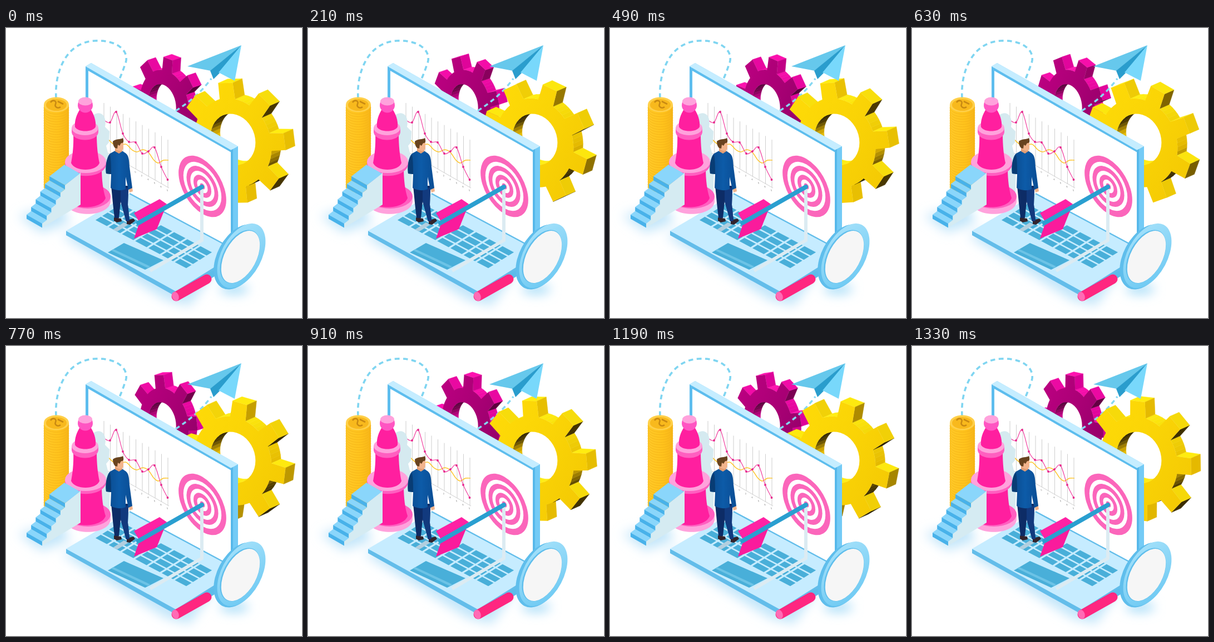
An HTML page for the animation above (1.4 s loop, 532 px wide and 522 px high).

```html
<!DOCTYPE html>
<html lang="en">
<head>
<meta charset="utf-8">
<title>Business target</title>
<style>
html, body { margin: 0; width: 100%; height: 100%; overflow: hidden; background: #fff; }
svg { display: block; width: 532px; height: 522px; }
text { font: 4px Arial, "Liberation Sans", sans-serif; fill: #555; }
</style>
</head>
<body>
<svg viewBox="0 0 532 522">
<defs>
  <filter id="soft" x="-30%" y="-60%" width="160%" height="220%"><feGaussianBlur stdDeviation="10"/></filter>
  <linearGradient id="gold" x2="1" y2=".6"><stop stop-color="#ffdc08"/><stop offset=".6" stop-color="#fad406"/><stop offset="1" stop-color="#f5cb04"/></linearGradient>
  <linearGradient id="plum" x2="1" y2=".7"><stop stop-color="#c00084"/><stop offset=".6" stop-color="#a80074"/><stop offset="1" stop-color="#94006a"/></linearGradient>
  <linearGradient id="coin"><stop stop-color="#ffc928"/><stop offset=".6" stop-color="#ffc31c"/><stop offset="1" stop-color="#f7b518"/></linearGradient>
  <linearGradient id="suit"><stop stop-color="#0a4a8c"/><stop offset=".5" stop-color="#0d5ba8"/><stop offset="1" stop-color="#0a4d94"/></linearGradient>
  <linearGradient id="rim" x2="1" y2="1"><stop stop-color="#a9e3fb"/><stop offset="1" stop-color="#68c7f2"/></linearGradient>
</defs>

<g filter="url(#soft)" fill="#c3e6fa">
  <path d="M22 338L100 318 115 350 64 368Z"/>
  <path d="M100 374L200 350 370 445 330 500 288 490Z"/>
  <ellipse cx="410" cy="470" rx="26" ry="9" fill="#a5dcf8"/>
</g>

<path d="M90 126C87 78 109 25 160 23C203 21 225 44 213 68C210 78 207 84 204 92" fill="none" stroke="#7fd5f1" stroke-width="3.6" stroke-dasharray="8.5 6.5"/>
<g id="rear"></g>
<path d="M305 149Q345 124 369 91" fill="none" stroke="#86d8f2" stroke-width="3.4" stroke-dasharray="8 6"/>
<g id="front"></g>
<g>
  <path d="M423 31L326 69 368 77Z" fill="#66c8ec"/>
  <path d="M423 31L367 77 373 92 385 80Z" fill="#2a9dcd"/>
  <path d="M423 31L382 80 411 95Z" fill="#78d8fb"/>
</g>

<!-- laptop screen -->
<path d="M143 69L153 63 417 213V410L404 404V223L148 77V300H143Z" fill="#8fd8fb"/>
<path d="M148 76L404 223V404L222 300 148 300Z" fill="#fff"/>
<path d="M143 69L405 220V224L148 77V300H143Z" fill="#5dbdee"/>
<path d="M143 69L153 63 417 213 405 220Z" fill="#c5edff"/>
<path d="M404 220L417 213V410H404Z" fill="#74cbf6"/>
<path d="M404 220L408 218V406H404Z" fill="#57b8ea"/>

<g id="chart"></g>
<path d="M158 156C170 148 182 158 178 178L186 186 185 206 180 212 187 240 186 300H158Z" fill="#d5eaf0"/>

<!-- laptop base -->
<path d="M108 365L305 473 418 403V412L305 483 108 373Z" fill="#63bdea"/>
<path d="M108 365L222 298 418 403 305 474Z" fill="#c6ecff"/>
<path d="M222 298L404 395.500" stroke="#62bdea" stroke-width="2.500"/>
<g id="keys"></g>
<path d="M183 404L212 387 283 418 250 435Z" fill="#49afd9"/>
<path d="M189 400.500L193 398 259 429 255 432Z" fill="#6cc3e6"/>
<path d="M192 363L212 350 220 354 200 366Z" fill="#b2cfdf"/>

<!-- target and arrow -->
<g id="rings"></g>
<path d="M352 290V382L259 437" fill="none" stroke="#dcebf2" stroke-width="6"/>
<path d="M230 333L276 308 289 317 240 350Z" fill="#ff22a4"/>
<path d="M289 317L271 362 230 379 240 350Z" fill="#fa1b9c"/>
<path d="M352 286L238 351" stroke="#2a9fd0" stroke-width="8" stroke-linecap="round"/>

<!-- coins -->
<g id="coins"></g>

<!-- chess piece -->
<g>
  <path d="M106 303V313C110 342 184 342 188 313V303Z" fill="#ffa2dc"/>
  <ellipse cx="147" cy="303" rx="41" ry="22" fill="#ff5fc0"/>
  <path d="M113 250C114 280 110 296 107 306C115 328 172 328 179 306C174 290 172 272 172 250Z" fill="#ff1f9f"/>
  <path d="M106 240V246C110 273 176 273 180 246V240Z" fill="#ff5fc0"/>
  <ellipse cx="143" cy="241" rx="37" ry="20" fill="#ffa2dc"/>
  <path d="M121 190C122 215 119 232 117 243C124 259 162 259 168 243C165 230 163 212 163 190Z" fill="#ff1f9f"/>
  <path d="M118 179V188C121 206 163 206 166 188V179Z" fill="#ff5fc0"/>
  <ellipse cx="142" cy="180" rx="24" ry="13" fill="#ffa2dc"/>
  <path d="M133 146C127 156 123 166 124 178C129 188 156 188 161 178C162 166 158 156 152 146Z" fill="#ff1f9f"/>
  <circle cx="142.500" cy="139" r="13.500" fill="#ff55c2"/>
  <ellipse cx="142.500" cy="132" rx="12.500" ry="7.500" fill="#ffa2dc"/>
</g>

<g id="stairs"></g>

<!-- man -->
<g>
  <path d="M194 341L207 343 208 348 199 350 194 347Z" fill="#33242c"/>
  <path d="M217 346L229 343 232 347 223 354 217 353Z" fill="#33242c"/>
  <path d="M189 284L220 284 219 318 222 347 216 348 206 312 203 342 195 342 192 315Z" fill="#0d2c66"/>
  <path d="M206 288L220 288 219 318 222 347 216 348 206 312Z" fill="#123a7e"/>
  <path d="M220 289L227 288 228 294 222 296Z" fill="#f2b48c"/>
  <path d="M196 221L207 220 213 224C221 228 221 237 222 250L227 288 220 291 215 268V290C205 294 196 292 188 288L189 263 180 262C178 246 182 230 187 226Z" fill="url(#suit)"/>
  <path d="M187 228C189 240 189 252 189 263L180 262C178 246 182 232 187 228Z" fill="#083c74"/>
  <path d="M196 216H209V222L203 226 196 222Z" fill="#e39f75"/>
  <path d="M197 207L211 205 211 217C209 223 200 222 197 217Z" fill="#f2b48c"/>
  <path d="M192 204C197 199 206 201 210 198C213 205 210 208 207 207L204 212 201 210 200 217 196 216C193 213 192 209 192 204Z" fill="#68431f"/>
</g>

<!-- magnifier -->
<path d="M350 455L371 443" stroke="#5cbcea" stroke-width="11" stroke-linecap="round"/>
<path d="M306 483L361 452" stroke="#ff2780" stroke-width="17" stroke-linecap="round"/>
<ellipse cx="304.500" cy="483" rx="6" ry="8.500" transform="rotate(-20 304.500 483)" fill="#ff6bb5"/>
<g>
  <ellipse cx="418" cy="412" rx="38" ry="63" transform="rotate(28 418 412)" fill="#5fbeec"/>
  <ellipse cx="423" cy="410" rx="36" ry="63" transform="rotate(28 423 410)" fill="url(#rim)"/>
  <ellipse cx="420.500" cy="411.500" rx="30" ry="52" transform="rotate(28 420.500 411.500)" fill="#5fbeec"/>
  <ellipse cx="421.500" cy="412" rx="28.500" ry="51" transform="rotate(28 421.500 412)" fill="#f6f6f6"/>
</g>
</svg>

<script>
const el = id => document.getElementById(id);
const fix = n => +n.toFixed(2);
const pt = p => fix(p[0]) + ' ' + fix(p[1]);
const poly = pts => 'M' + pts.map(pt).join('L') + 'Z';
const path = (d, fill) => `<path d="${d}" fill="${fill}"/>`;
const rad = Math.PI / 180;

// Smooth curve through points
function curve(p) {
  let d = 'M' + pt(p[0]);
  for (let i = 0; i < p.length - 1; i++) {
    const a = p[i - 1] || p[i], b = p[i], c = p[i + 1], e = p[i + 2] || c;
    const ctl = k => [b[k] + (c[k] - a[k]) / 6, c[k] - (e[k] - b[k]) / 6];
    const [x1, x2] = ctl(0), [y1, y2] = ctl(1);
    d += 'C' + [x1, y1, x2, y2, ...c].map(fix).join(' ');
  }
  return d;
}

function drawChart() {
  let s = '';
  for (let i = 0; i < 11; i++) {
    const x = 176 + i * 11.5, y = 135 + i * 6.6;
    s += `<path d="M${x} ${y}V${fix(y + 86)}" stroke="#c9c9c9" stroke-width=".9"/>`;
    if (i > 4) s += `<text transform="matrix(.87 .5 0 1 ${x - 2} ${fix(y + 92)})">${i * 2 % 10}</text>`;
  }
  s += '<path d="M176 221L293 288" stroke="#c9c9c9" stroke-width=".9"/>';
  const gold = [[180, 197], [198, 212], [215, 209], [226, 219], [235, 223], [246, 219], [256, 224], [266, 238], [274, 243], [283, 238], [292, 238]];
  const pink = [[176, 166], [187, 170], [198, 151], [210, 190], [221, 205], [233, 206], [245, 226], [256, 222], [267, 215], [279, 250], [290.5, 273]];
  s += `<path d="${curve(gold)}" fill="none" stroke="#fdc52c" stroke-width="1.5"/>`;
  s += `<path d="${curve(pink)}" fill="none" stroke="#f0409f" stroke-width="1.2"/>`;
  s += pink.slice(1).map(p => `<circle cx="${p[0]}" cy="${p[1]}" r="1.9" fill="#e8258c"/>`).join('');
  el('chart').innerHTML = s;
}

function drawKeys() {
  const cols = 7, pitch = 13 / cols;
  const at = (i, j) => [207 + i * 12.8 - j * 12.2, 317 + i * 6.8 + j * 7.6];
  let s = '';
  for (let j = 0; j < 4; j++)
    for (let k = 0; k < cols; k++) {
      const a = k * pitch, b = a + pitch * .86, e = j + .78;
      s += path(poly([at(a, j), at(b, j), at(b, e), at(a, e)]), '#49afd9');
    }
  el('keys').innerHTML = s;
}

function drawRings() {
  el('rings').innerHTML = '<g transform="matrix(.866 .5 0 1 353 285)">' +
    [49.5, 39.5, 33, 25, 18.5, 11, 5].map((r, i) =>
      `<circle r="${r}" fill="${i % 2 ? '#fff' : '#fb66bb'}"/>`).join('') + '</g>';
}

function drawCoins() {
  let s = path('M68 138V285C70 300 111 300 113 285V138Z', 'url(#coin)');
  for (let y = 143; y < 288; y += 4.6)
    s += `<path d="M68 ${fix(y)}C70 ${fix(y + 16)} 111 ${fix(y + 16)} 113 ${fix(y)}" fill="none" stroke="#f4b319" stroke-width=".8"/>`;
  s += '<ellipse cx="90.5" cy="138" rx="22.5" ry="13.5" fill="#ffd04a"/>' +
    '<ellipse cx="90.5" cy="138.5" rx="18.5" ry="10.5" fill="#f8b91d"/>' +
    '<path d="M80 134C84 128 92 131 89 137C87 142 93 146 98 142M93 132L103 137" fill="none" stroke="#c98a12" stroke-width="2.6"/>';
  el('coins').innerHTML = s;
}

function drawStairs() {
  const n = 6, w = [28, 16], rise = 7.5, edge = [];
  const step = k => [78 - 8.2 * k, 267 + 13.8 * k];
  let s = '';
  for (let k = 0; k < n; k++) {
    const [x, y] = step(k), back = k ? [8.2, -6.3] : [27, -21];
    const r = [x + w[0], y + w[1]];
    s += path(poly([[x, y], r, [r[0] + back[0], r[1] + back[1]], [x + back[0], y + back[1]]]), '#8ad6fb');
    s += path(poly([[x, y], r, [r[0], r[1] + rise], [x, y + rise]]), '#48b2ea');
    if (k) edge.push([r[0] + 8.2, r[1] - 6.3]);
    edge.push(r, [r[0], r[1] + rise]);
  }
  el('stairs').innerHTML = path(poly([[134, 260], ...edge, [134, 318]]), '#d5ebf2') + s;
}

// Blend through shade stops; t runs from -1 (facing down) to 1 (facing up)
function shade(stops, t) {
  let i = stops.findIndex(q => q[0] >= t);
  if (i < 1) i = i ? stops.length - 1 : 1;
  const [a, ca] = stops[i - 1], [b, cb] = stops[i];
  const k = Math.min(1, Math.max(0, (t - a) / (b - a)));
  return `rgb(${ca.map((c, j) => Math.round(c + (cb[j] - c) * k))})`;
}

const gears = [
  { id: 'rear', mid: [292, 138], u: [60, 13], h: 88, depth: [15, -5], hole: [-4, -2, .42],
    start: 6.5, turn: 6.75, face: 'url(#plum)',
    stops: [[-1, [60, 0, 40]], [-.4, [120, 0, 80]], [0, [214, 0, 148]], [1, [255, 18, 176]]] },
  { id: 'front', mid: [416, 203], u: [95, 13], h: 108, depth: [17, -7.5], hole: [.5, -6, .425],
    start: -8, turn: -6.75, face: 'url(#gold)',
    stops: [[-1, [28, 21, 0]], [-.45, [84, 64, 0]], [0, [228, 184, 0]], [1, [255, 236, 16]]] }
];

function drawGear(g, n) {
  const { mid, u, h, depth: d } = g;
  const at = (r, deg, ox = 0, oy = 0) => {
    const c = r * Math.sin(deg * rad), v = -r * Math.cos(deg * rad);
    return [mid[0] - d[0] / 2 + ox + c * u[0], mid[1] - d[1] / 2 + oy + c * u[1] + v * h];
  };
  const outer = [], inner = [], root = .735;
  for (let k = 0; k < 8; k++) {
    const a = g.start + g.turn * n + k * 45;
    outer.push(at(root, a - 11.5), at(1, a - 8), at(1, a + 8));
    for (let i = 0; i < 4; i++) outer.push(at(root, a + 11.5 + i * 5.5));
  }
  for (let a = 360; a > 0; a -= 9) inner.push(at(g.hole[2], a, g.hole[0], g.hole[1]));

  const sides = [];
  for (const ring of [outer, inner]) ring.forEach((p, i) => {
    const q = ring[(i + 1) % ring.length];
    const nx = q[1] - p[1], ny = p[0] - q[0], len = Math.hypot(nx, ny);
    if (nx * d[0] + ny * d[1] <= 0) return;
    const fill = shade(g.stops, -ny / len);
    const quad = [p, q, [q[0] + d[0], q[1] + d[1]], [p[0] + d[0], p[1] + d[1]]];
    sides.push({ key: (p[0] + q[0]) * d[0] + (p[1] + q[1]) * d[1],
      svg: `<path d="${poly(quad)}" fill="${fill}" stroke="${fill}" stroke-width=".5"/>` });
  });
  sides.sort((a, b) => a.key - b.key);
  el(g.id).innerHTML = sides.map(s => s.svg).join('') +
    `<path d="${poly(outer)}${poly(inner)}" fill="${g.face}" fill-rule="evenodd"/>`;
}

drawChart();
drawKeys();
drawRings();
drawCoins();
drawStairs();

let last = -1;
function render(ms) {
  const n = Math.floor(ms % 1400 / 70);
  if (n !== last) {
    last = n;
    gears.forEach(g => drawGear(g, n));
  }
}
const t0 = performance.now();
function tick() {
  render(performance.now() - t0);
  requestAnimationFrame(tick);
}
tick();
</script>
</body>
</html>
```
